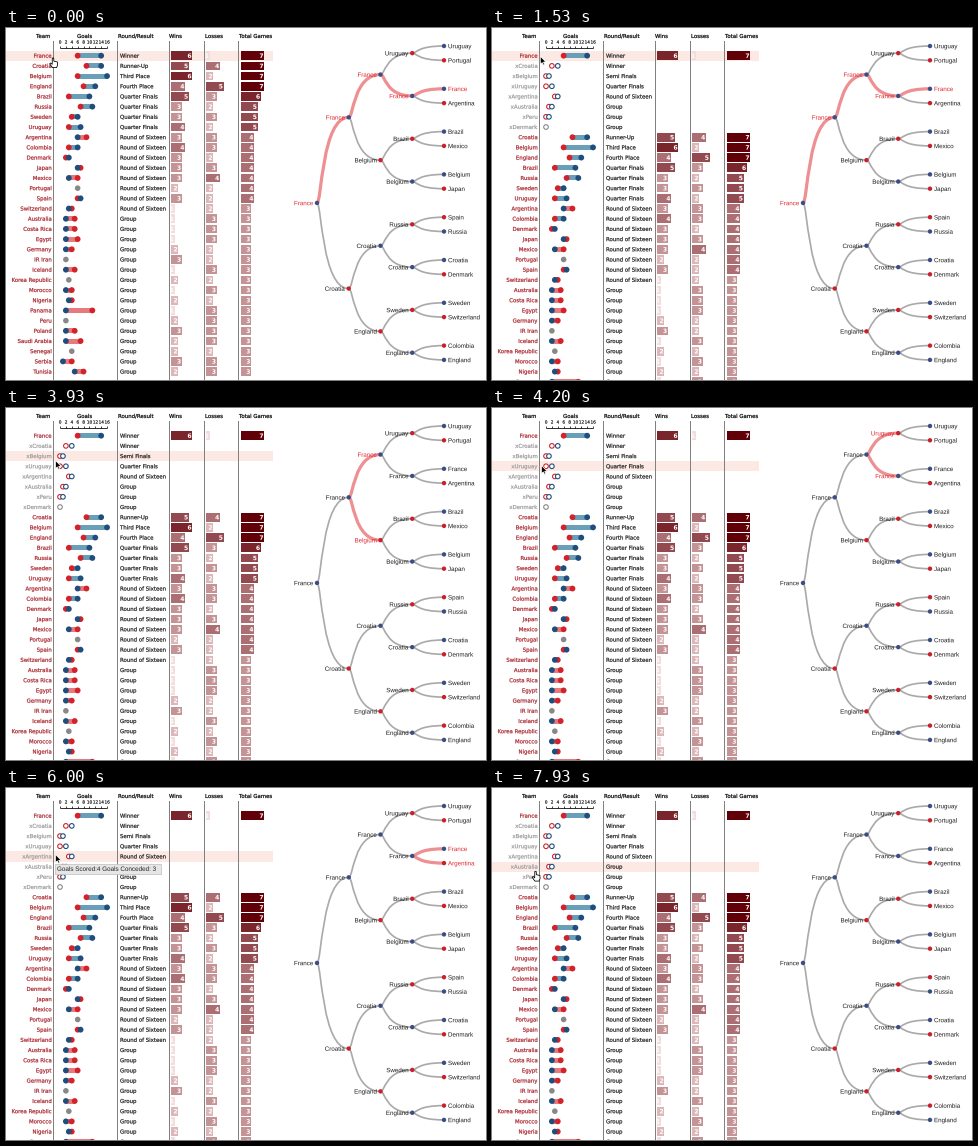
Recreate the animation shown at these times as a matplotlib script. Size 480 by 352 pixels, loop 8000 ms.

```python
import numpy as np
import matplotlib.pyplot as plt
from matplotlib.animation import FuncAnimation
from matplotlib.collections import PathCollection
from matplotlib.path import Path
from matplotlib.textpath import TextPath

W, H, DPI = 480, 352, 32
PX = 72 / DPI                      # line widths are given in pixels
LOOP, FRAMES = 8000, 200
STEP = LOOP / FRAMES
TICKS_PER_MS = 15 / 1000           # the screen refreshes 15 times a second

SANS, ARIAL = "DejaVu Sans", "Liberation Sans"
INK, MAROON, FADED = "#1c1c1c", "#a9232b", "#9a9a9a"
BLUE, RED, GREY = "#1f4e7d", "#d3222a", "#888888"
LINK, LIT_LINK, LIT_LABEL = "#aaaaaa", "#ee8f92", "#e0262e"
ROW_H, TOP = 10.19, 22.6
TEXT = 5.4

# team, goals scored, goals conceded, wins, losses
TEAMS = [
    ("France", 14, 6, 6, 1), ("Croatia", 14, 9, 5, 4),
    ("Belgium", 16, 6, 6, 2), ("England", 12, 8, 4, 5),
    ("Brazil", 10, 3, 5, 3), ("Russia", 11, 7, 3, 2),
    ("Sweden", 6, 4, 3, 3), ("Uruguay", 7, 3, 4, 2),
    ("Argentina", 6, 9, 3, 3), ("Colombia", 6, 3, 4, 3),
    ("Denmark", 3, 2, 3, 2), ("Japan", 6, 7, 3, 3),
    ("Mexico", 3, 6, 3, 4), ("Portugal", 6, 6, 2, 2),
    ("Spain", 7, 6, 3, 2), ("Switzerland", 3, 4, 1, 2),
    ("Australia", 2, 5, 1, 3), ("Costa Rica", 2, 5, 1, 3),
    ("Egypt", 2, 6, 1, 3), ("Germany", 2, 4, 2, 2),
    ("IR Iran", 2, 2, 3, 2), ("Iceland", 2, 5, 1, 3),
    ("Korea Republic", 3, 3, 2, 2), ("Morocco", 2, 4, 1, 3),
    ("Nigeria", 3, 4, 2, 2), ("Panama", 2, 11, 1, 3),
    ("Peru", 2, 2, 2, 3), ("Poland", 2, 5, 3, 3),
    ("Saudi Arabia", 2, 7, 2, 3), ("Senegal", 4, 4, 2, 2),
    ("Serbia", 1, 4, 3, 3), ("Tunisia", 5, 8, 2, 3),
]
# round reached, number of teams, games played
STAGES = [("Winner", 1, 7), ("Runner-Up", 1, 7), ("Third Place", 1, 7),
          ("Fourth Place", 1, 7), ("Quarter Finals", 1, 6),
          ("Quarter Finals", 3, 5), ("Round of Sixteen", 7, 4),
          ("Round of Sixteen", 1, 3), ("Group", 16, 3)]
RESULTS = [(label, games) for label, count, games in STAGES for _ in range(count)]
MATCHES = [("Croatia", 4, 2, "Winner"), ("Belgium", 1, 0, "Semi Finals"),
           ("Uruguay", 2, 0, "Quarter Finals"),
           ("Argentina", 4, 3, "Round of Sixteen"), ("Australia", 2, 1, "Group"),
           ("Peru", 1, 0, "Group"), ("Denmark", 0, 0, "Group")]

ROUNDS = [row.split() for row in (
    "France", "France Croatia", "France Belgium Croatia England",
    "Uruguay France Brazil Belgium Russia Croatia Sweden England",
    "Uruguay Portugal France Argentina Brazil Mexico Belgium Japan "
    "Spain Russia Croatia Denmark Sweden Switzerland Colombia England")]
CHAMPION = [0, 0, 0, 1, 2]

fig = plt.figure(figsize=(W / DPI, H / DPI), dpi=DPI, facecolor="white")
ax = fig.add_axes([0, 0, 1, 1])
ax.axis("off")


def glyphs(x, y, s, size=TEXT, font=SANS, align="left", weight="normal"):
    """Outline of a string, vertically centred on y."""
    path = TextPath((0, 0), s, size=size, prop={"family": font, "weight": weight})
    width = path.get_extents().x1
    x -= {"left": 0, "center": width / 2, "right": width}[align]
    return Path(path.vertices * [1, -1] + [x, y + 0.365 * size], path.codes)


def polygon(points):
    points = list(points)
    return Path(points + points[:1], closed=True)


def rect(x, y, w, h):
    return polygon([(x, y), (x + w, y), (x + w, y + h), (x, y + h)])


class Layer:
    """Shapes in paint order, drawn as a single collection."""

    def __init__(self, z):
        self.z, self.shapes = z, []

    def add(self, path, face="none", edge="none", lw=0):
        self.shapes.append((path, face, edge, lw * PX))

    def text(self, x, y, s, color, align="left", size=TEXT):
        """Slightly emboldened label."""
        self.add(glyphs(x, y, s, size, align=align), color, color, 0.2)

    def build(self):
        paths, faces, edges, widths = zip(*self.shapes)
        art = PathCollection(paths, facecolors=list(faces), edgecolors=list(edges),
                             linewidths=list(widths), zorder=self.z)
        art.set_transform(ax.transData)
        ax.add_collection(art, autolim=False)
        return art


def row_y(i):
    return TOP + (i + 0.5) * ROW_H


def goal_x(goals):
    return 54 + 2.94 * goals


def shade(value):
    k = (value - 1) / 6
    low, high = np.array([243, 220, 220]), np.array([98, 0, 8])
    return tuple((low + (high - low) * k) / 255)


def count_bar(layer, x, y, value, unit):
    width = value * unit
    layer.add(rect(x, y - 4.3, width, 8.6), shade(value))
    layer.add(glyphs(x + width - 1, y, str(value), 6, align="right", weight="bold"),
              "white")


def team_row(layer, i, team, result):
    name, scored, conceded, wins, losses = team
    label, games = result
    y, a, b = row_y(i), goal_x(scored), goal_x(conceded)
    layer.text(45.3, y, name, MAROON, "right")
    if scored == conceded:
        layer.add(Path.circle((a, y), 2.8), GREY)
    else:
        layer.add(rect(min(a, b), y - 2.5, abs(a - b), 5),
                  "#6a9fba" if a > b else "#e67a7d")
        layer.add(Path.circle((b, y), 2.9), RED)
        layer.add(Path.circle((a, y), 2.9), BLUE)
    layer.text(114, y, label, INK)
    count_bar(layer, 165, y, wins, 3.55)
    count_bar(layer, 200, y, losses, 3.5)
    count_bar(layer, 235, y, games, 3.3)


def match_row(layer, i, match):
    name, scored, conceded, label = match
    y = row_y(i)
    layer.text(45.3, y, "x" + name, FADED, "right")
    dots = [(conceded, RED), (scored, BLUE)] if scored != conceded else [(scored, GREY)]
    for goals, color in dots:
        layer.add(Path.circle((goal_x(goals), y), 2.3), "white", color, 1.1)
    layer.text(114, y, label, INK)


def build_table(expanded):
    layer = Layer(2)
    shift = len(MATCHES) if expanded else 0
    for i, (team, result) in enumerate(zip(TEAMS, RESULTS)):
        row = i + shift if i else 0
        if row_y(row) < H + 6:
            team_row(layer, row, team, result)
    for i, match in enumerate(MATCHES[:shift]):
        match_row(layer, i + 1, match)
    return layer.build()


def build_header():
    layer = Layer(3)
    for x, s, align in [(37, "Team", "center"), (78.5, "Goals", "center"),
                        (112, "Round/Result", "left"), (163, "Wins", "left"),
                        (199, "Losses", "left"), (233, "Total Games", "left")]:
        layer.text(x, 8, s, "black", align)
    for x in (47.5, 111.5, 163.5, 198.5, 232.5):
        layer.add(rect(x - 0.5, 13, 1, H - 13), "#808080")
    layer.add(Path([(goal_x(0), 19.5), (goal_x(16), 19.5)]), edge="black", lw=0.8)
    for goals in range(0, 17, 2):
        x = goal_x(goals)
        layer.add(Path([(x, 17.5), (x, 19.5)]), edge="black", lw=0.7)
        layer.text(x, 14, str(goals), INK, "center", 4.2)
    return layer.build()


def node_xy(level, j):
    span = 2 ** (4 - level)
    leaves = np.arange(j * span, (j + 1) * span)
    return 311 + 31.75 * level, np.mean(18 + leaves // 2 * 42.8 + leaves % 2 * 14.3)


def build_tree():
    links, dots, labels = Layer(4), Layer(5), Layer(6)
    for level, j in NODES:
        name = ROUNDS[level][j]
        x, y = node_xy(level, j)
        won = True
        if level:
            px, py = node_xy(level - 1, j // 2)
            bend = px + 0.15 * (x - px)    # links turn close to the parent
            curve = Path([(px, py), (bend, py), (bend, y), (x, y)], [1, 4, 4, 4])
            links.add(curve, edge=LINK, lw=1.7)
            won = name == ROUNDS[level - 1][j // 2]
        dots.add(Path.circle((x, y), 2.2), "#3a4d85" if won else "#c9202b")
        side = ("left", 4) if level == 4 else ("right", -4)
        labels.add(glyphs(x + side[1], y, name, 6.2, ARIAL, side[0]), INK)
    dots.build()
    return links.build(), labels.build()


def build_tooltip():
    layer = Layer(8)
    layer.add(rect(48.5, 75.5, 106, 10.5), "#e6e6e6", "#c4c4c4", 0.8)
    layer.add(glyphs(51, 80.6, "Goals Scored:4 Goals Conceded: 3", 6.3, ARIAL), INK)
    return layer.build()


def single(path, z, face, edge="none", lw=0):
    layer = Layer(z)
    layer.add(path, face, edge, lw)
    return layer.build()


NODES = [(level, j) for level in range(5) for j in range(2 ** level)]


def lit_nodes(row):
    if row == 0:
        return set(enumerate(CHAMPION))
    if row > 4:
        return set()
    first = 2 * CHAMPION[row - 1]
    return {(row, first), (row, first + 1)}


ARROW = np.array([(0, 0), (0, 8), (1.9, 6.4), (3.1, 9), (4.3, 8.4), (3.2, 5.9), (5.6, 5.7)])
HAND = np.array([(-0.7, 0), (0.7, 0), (0.9, 3.2), (4.4, 4), (4.6, 7), (3.6, 9.6),
                 (-0.6, 9.6), (-3.3, 5.8), (-2.4, 5), (-0.8, 6.3)])

# tick, x, y of the pointer tip
POINTER = np.array([
    (0, 46.5, 29.5), (3, 38, 32), (6, 38, 32), (10, 36, 32.2), (22, 36, 32.2),
    (23, 47.8, 27.7), (26, 48, 29), (27, 48, 29), (32, 48.5, 38.5), (43, 48.5, 39),
    (45, 49, 42), (49, 49, 48), (58, 49, 50), (59, 49, 52), (63, 49, 57),
    (82, 49, 57), (83, 49, 58), (88, 49, 66), (98, 49, 66), (111, 48, 79),
    (115, 37, 80), (119, 43, 83)])
EXPAND, TIP_ON, TIP_OFF = 23, 90, 98

build_header()
tables = [build_table(False), build_table(True)]
links, labels = build_tree()
tooltip = build_tooltip()
band = single(rect(0, 0, 1, 1), 1, "#fde9e4")
arrow = single(polygon(ARROW), 9, "black", "white", 0.7)
hand = single(polygon(HAND), 9, "white", "black", 0.8)
ax.set_xlim(0, W)
ax.set_ylim(H, 0)


def update(i):
    tick = int((i + 0.5) * STEP * TICKS_PER_MS)
    x, y = (np.interp(tick, POINTER[:, 0], POINTER[:, k]) for k in (1, 2))

    over_name = x < 47
    hand.set_visible(over_name)
    arrow.set_visible(not over_name)
    cursor, shape = (hand, HAND) if over_name else (arrow, ARROW)
    cursor.set_paths([polygon(shape + [x, y])])

    row = int((y - TOP) // ROW_H)
    band.set_paths([rect(0, TOP + row * ROW_H, 267, ROW_H)])
    for k, table in enumerate(tables):
        table.set_visible((tick >= EXPAND) == bool(k))

    lit = lit_nodes(row)
    on = [node in lit for node in NODES]
    labels.set_facecolor([LIT_LABEL if flag else INK for flag in on])
    links.set_edgecolor([LIT_LINK if flag else LINK for flag in on[1:]])
    links.set_linewidth([(3.2 if flag else 1.7) * PX for flag in on[1:]])

    tooltip.set_visible(TIP_ON <= tick < TIP_OFF + 4)
    tooltip.set_alpha(float(np.clip(1 - (tick - TIP_OFF) / 4, 0, 1)))


anim = FuncAnimation(fig, update, frames=FRAMES, interval=STEP, init_func=lambda: None,
                     repeat=True, repeat_delay=0, blit=False, cache_frame_data=False)
plt.show()
```
